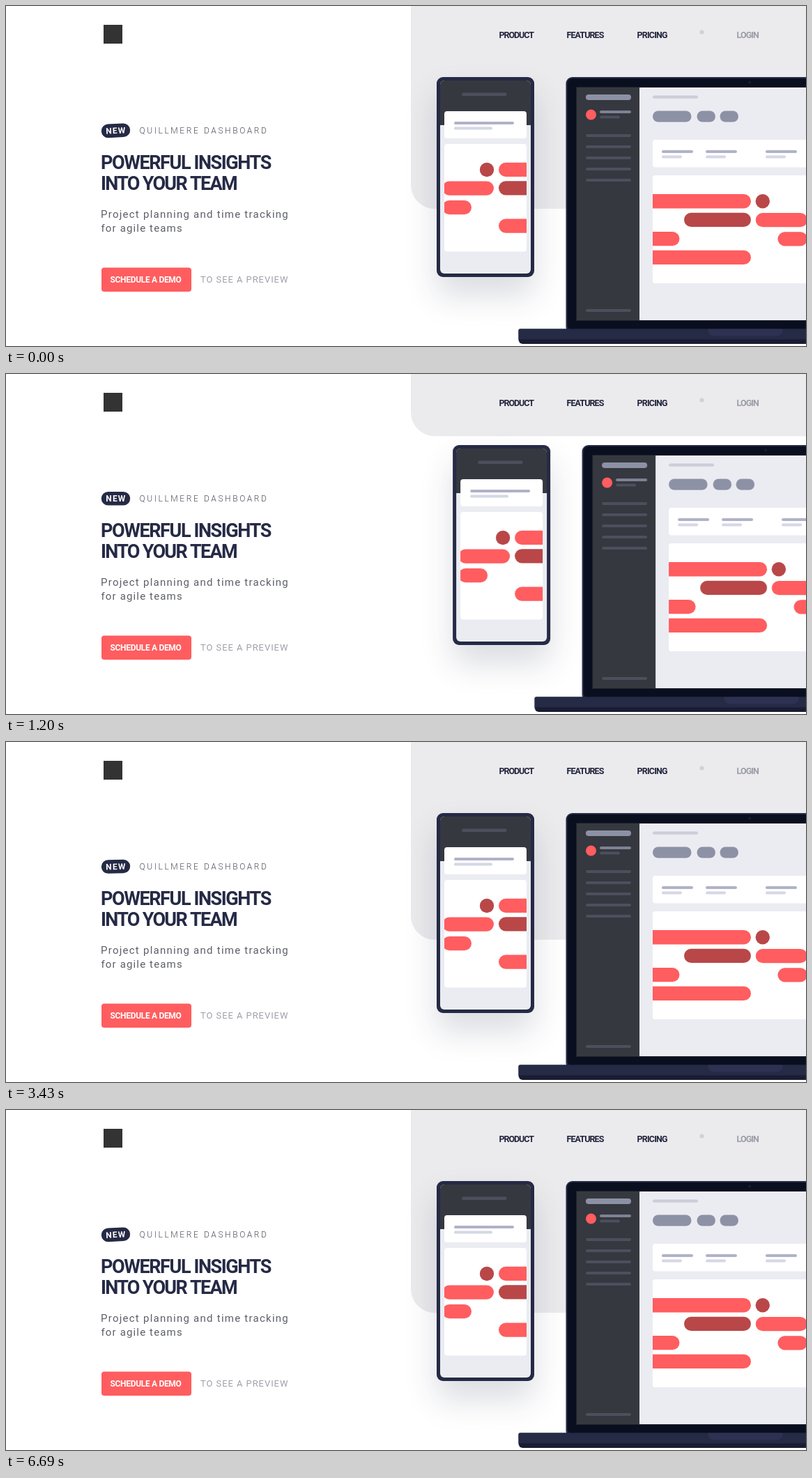
These frames come from a looping animation (1148 by 488 pixels, 6770 ms). An HTML page with a canvas:

```html
<!DOCTYPE html>
<html lang="en">
<head>
<meta charset="utf-8">
<title>Landing page</title>
<style>
html, body { margin: 0; width: 100%; height: 100%; overflow: hidden; background: #fff; }
canvas { display: block; }
</style>
</head>
<body>
<canvas id="stage" width="1148" height="488"></canvas>
<script>
const W = 1148, H = 488, LOOP = 6770;
const NAVY = '#252a45', SLATE = '#35383f', RED = '#ff5d5f', MAROON = '#b94748';
const SCREEN = '#ebecf2', STEEL = '#8d91a5', LILAC = '#b0b2c8', PALE = '#d5d7e4', DIM = '#4c4f5d';
const stage = document.getElementById('stage').getContext('2d');

// Shapes are given by their edges: left, top, right, bottom.
function box(c, x1, y1, x2, y2, r, fill) {
  c.beginPath();
  c.roundRect(x1, y1, x2 - x1, y2 - y1, r);
  c.fillStyle = fill;
  c.fill();
}

function pill(c, x1, y1, x2, y2, fill) {
  box(c, x1, y1, x2, y2, (y2 - y1) / 2, fill);
}

function disc(c, x, y, r, fill) {
  c.beginPath();
  c.arc(x, y, r, 0, Math.PI * 2);
  c.fillStyle = fill;
  c.fill();
}

function clipped(c, x1, y1, x2, y2, r, paint) {
  c.save();
  c.beginPath();
  c.roundRect(x1, y1, x2 - x1, y2 - y1, r);
  c.clip();
  paint();
  c.restore();
}

function label(c, text, x, y, size, weight, color, spacing) {
  c.font = `${weight} ${size}px Roboto, sans-serif`;
  c.letterSpacing = spacing + 'px';
  c.fillStyle = color;
  c.fillText(text, x, y);
}

function drawPhone(c) {
  c.save();
  c.shadowColor = 'rgba(40, 46, 84, 0.17)';
  c.shadowBlur = 46;
  c.shadowOffsetY = 26;
  box(c, 618, 102, 758, 389, 9, NAVY);
  c.restore();
  clipped(c, 623, 107, 753, 384, 6, () => {
    box(c, 623, 107, 753, 384, 0, SCREEN);
    box(c, 623, 107, 753, 171, 0, SLATE);
  });
  pill(c, 654, 124.5, 718.5, 129, DIM);
  box(c, 629, 151, 747, 190, 4, '#fff');
  pill(c, 643, 166, 729, 170, LILAC);
  pill(c, 643, 173.5, 698, 177.5, PALE);
  box(c, 629, 198, 747, 352.5, 4, '#fff');
  clipped(c, 629, 198, 747, 352.5, 4, () => {
    disc(c, 690, 235, 10.2, MAROON);
    pill(c, 707, 224.8, 780, 245, RED);
    pill(c, 626, 251.5, 700, 271.7, RED);
    pill(c, 707, 251.2, 780, 271.4, MAROON);
    pill(c, 626, 279, 668, 299.2, RED);
    pill(c, 707, 305.5, 780, 325.7, RED);
  });
}

function drawSidebar(c) {
  box(c, 819, 117, 909, 451, 0, SLATE);
  pill(c, 832, 127, 897, 135, STEEL);
  disc(c, 839.5, 156, 7.5, RED);
  pill(c, 852, 150, 897, 154, '#7f8294');
  pill(c, 852, 157.5, 881, 161.5, DIM);
  for (const y of [186, 202, 218, 234, 250, 437]) pill(c, 832, y - 2, 897, y + 2, DIM);
}

function drawLaptop(c) {
  box(c, 803.5, 102, 1318, 470, 9, NAVY);
  box(c, 805.5, 104, 1316, 465, 7, '#0a0f20');
  disc(c, 1067, 109.5, 2, '#191c33');
  box(c, 818, 116, 1304, 452, 0, '#20222b');
  box(c, 819, 117, 1303, 451, 0, SCREEN);
  drawSidebar(c);

  pill(c, 928, 128.5, 993, 132.8, '#cbcdd8');
  for (const [a, b] of [[928, 983.5], [991.5, 1018], [1024.5, 1051]]) pill(c, a, 150.5, b, 166.5, STEEL);
  box(c, 928, 192, 1290, 231.5, 4, '#fff');
  for (const x of [941, 1004, 1090]) {
    pill(c, x, 207, x + 45, 211, LILAC);
    pill(c, x, 214.5, x + 29, 218.5, PALE);
  }
  box(c, 928, 243, 1290, 398, 4, '#fff');
  clipped(c, 928, 243, 1290, 398, 4, () => {
    pill(c, 900, 270, 1069, 290.4, RED);
    disc(c, 1085.8, 280.2, 10.2, MAROON);
    pill(c, 973, 296.7, 1069, 317, MAROON);
    pill(c, 1075.7, 297, 1150, 317.2, RED);
    pill(c, 900, 324, 966.5, 344.2, RED);
    pill(c, 1107.5, 324.2, 1150, 344.5, RED);
    pill(c, 900, 350.8, 1069, 371, RED);
  });

  box(c, 735.5, 463.5, 1387, 485, [2, 2, 6, 6], '#191c33');
  box(c, 735.5, 463.5, 1387, 478.5, [2, 2, 0, 0], NAVY);
  box(c, 1007.5, 463.5, 1114.5, 473.5, [0, 0, 8, 8], '#2e3152');
}

// The devices share one layer so that they fade as a group.
const devices = document.createElement('canvas');
devices.width = 1420;
devices.height = H;
drawPhone(devices.getContext('2d'));
drawLaptop(devices.getContext('2d'));

const sine = p => (1 - Math.cos(Math.PI * Math.min(1, Math.max(0, p)))) / 2;

function devicePose(t) {
  if (t < 80) return { shift: 0, alpha: 1 };
  const enter = sine((t - 324) / 494);
  const settle = sine((t - 1110) / 330);
  return { shift: 500 - 472 * enter - 28 * settle, alpha: enter };
}

// Lower edge of the grey panel: [time, y]
const drop = [[480, 0], [800, 17], [1200, 89], [1440, 133], [2150, 219],
              [2560, 250], [2880, 267], [3580, 287], [4130, 291]];

function slope(i) {
  if (i === 0 || i === drop.length - 1) return 0;
  const [t0, y0] = drop[i - 1], [t1, y1] = drop[i + 1];
  return (y1 - y0) / (t1 - t0);
}

function panelEdge(t) {
  if (t < 80 || t >= 4130) return 291;
  if (t < 480) return 0;
  const i = drop.findIndex(p => p[0] > t) - 1;
  const [t0, y0] = drop[i], [t1, y1] = drop[i + 1];
  const d = t1 - t0, s = (t - t0) / d, s2 = s * s, s3 = s2 * s;
  return y0 + (y1 - y0) * (3 * s2 - 2 * s3)
    + d * (slope(i) * (s3 - 2 * s2 + s) + slope(i + 1) * (s3 - s2));
}

function badgeAngle(t) {
  const time = t < 80 ? t + LOOP : t;
  if (time < 2210) return 0;
  return -3.2 * Math.sin(Math.PI * (time - 2210) / 1000) ** 2;
}

function drawBadge(c, t) {
  c.save();
  c.translate(157.5, 178.8);
  c.rotate(badgeAngle(t) * Math.PI / 180);
  pill(c, -20.7, -9.8, 20.7, 9.8, NAVY);
  label(c, 'NEW', -14.3, 4.3, 12, 700, '#fff', 1.2);
  c.restore();
}

function drawCopy(c) {
  const ink = '#20243c', soft = '#5c5f68';
  box(c, 140, 27, 167, 54, 0, '#333');
  label(c, 'PRODUCT', 707.5, 45.5, 12.5, 700, ink, -1.05);
  label(c, 'FEATURES', 804.5, 45.5, 12.5, 700, ink, -0.9);
  label(c, 'PRICING', 905.5, 45.5, 12.5, 700, ink, -0.8);
  disc(c, 998.5, 37.5, 3, '#d0d0d6');
  label(c, 'LOGIN', 1048.5, 45.5, 12.5, 700, '#9c9da6', -0.9);

  label(c, 'QUILLMERE DASHBOARD', 191.5, 183, 12, 300, '#4c4f59', 2.6);
  label(c, 'POWERFUL INSIGHTS', 136, 234.3, 27, 700, NAVY, -1.4);
  label(c, 'INTO YOUR TEAM', 136, 264.3, 27, 700, NAVY, -1.7);
  label(c, 'Project planning and time tracking', 136, 304, 15, 400, soft, 1.25);
  label(c, 'for agile teams', 136.5, 324, 15, 400, soft, 1.15);

  box(c, 137, 375.5, 266, 410, 4, RED);
  label(c, 'SCHEDULE A DEMO', 149.5, 397, 12, 700, '#fff', -0.32);
  label(c, 'TO SEE A PREVIEW', 279, 397, 13, 400, '#a0a1a8', 0.93);
}

function draw(t) {
  const c = stage;
  c.fillStyle = '#fff';
  c.fillRect(0, 0, W, H);

  const edge = panelEdge(t);
  if (edge > 0) box(c, 581, edge - 400, 1200, edge, [0, 0, 0, 34], '#ebebed');

  const { shift, alpha } = devicePose(t);
  c.globalAlpha = alpha;
  c.drawImage(devices, shift, 0);
  c.globalAlpha = 1;

  drawCopy(c);
  drawBadge(c, t);
}

const start = performance.now();
function frame() {
  draw((performance.now() - start) % LOOP);
  requestAnimationFrame(frame);
}
frame();
</script>
</body>
</html>
```
